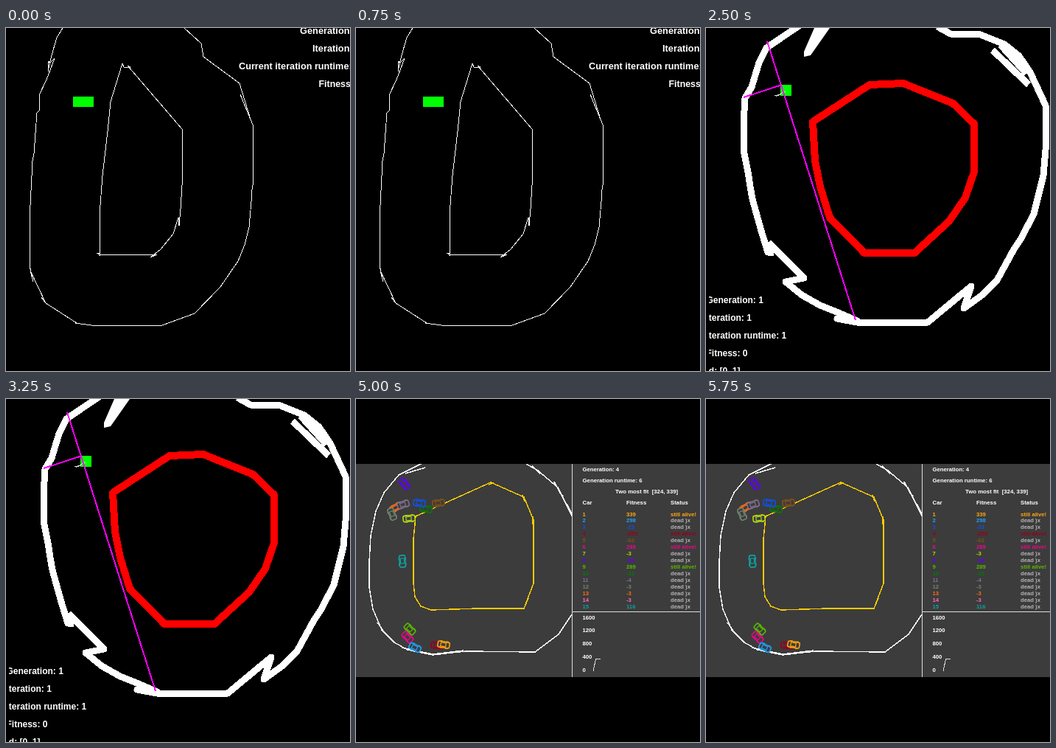
An HTML page that plays this animation: 467x465 px, repeating every 6.25 s.

```html
<!DOCTYPE html>
<html lang="en">
<head>
<meta charset="utf-8">
<title>Evolving cars</title>
<style>
html, body { margin: 0; width: 100%; height: 100%; overflow: hidden; background: #000; }
svg { display: block; width: 100%; height: 100%; }
text { font-family: "Liberation Sans", Arial, sans-serif; font-weight: bold; white-space: pre; }
</style>
</head>
<body>
<svg id="stage" viewBox="0 0 467 465">
  <defs>
    <clipPath id="belowTop"><rect y="4" width="467" height="461"/></clipPath>
    <clipPath id="rightOfEdge"><rect x="4" width="463" height="465"/></clipPath>
    <clipPath id="simTrack"><rect y="87" width="292" height="292"/></clipPath>
    <clipPath id="carTrack"><rect y="88" width="293" height="289"/></clipPath>
  </defs>
</svg>
<script>
const SCENE_MS = 1250;
const stage = document.getElementById("stage");

function add(parent, tag, attrs, content) {
  const el = document.createElementNS("http://www.w3.org/2000/svg", tag);
  for (const key in attrs) el.setAttribute(key, attrs[key]);
  if (content !== undefined) el.textContent = content;
  parent.appendChild(el);
  return el;
}

const line = (parent, d, stroke, width) => add(parent, "path", {
  d, stroke, fill: "none", "stroke-width": width, "stroke-linejoin": "round",
  "shape-rendering": "crispEdges"
});
const box = (parent, x, y, width, height, fill) =>
  add(parent, "rect", { x, y, width, height, fill });
const label = (parent, x, y, str, size, fill = "#fff") =>
  add(parent, "text", { x, y, fill, "font-size": size }, str);
const clipped = (parent, id) => add(parent, "g", { "clip-path": `url(#${id})` });

function outlineTrack(g) {
  line(g, `M77 0L69 13 64 30 60 45 57 59V45L60 47 66 41 55 70 45 91V112L42 115 38 170 36 180
    34 220 32 260V322L37 344 33 329 54 373 48 365 54 373 96 400H94L116 403H212L256 387 291 351
    315 316 324 294 330 270 333 235V225L335 213V131L318 90 332 124 317 75 268 39 265 21 242 0`, "#fff", 1);
  line(g, `M158 48L142 100 138 140 131 200 128 240 127 309V306L123 305 127 307H205L196 311 210 300
    227 279 234 257 235 268 237 245 239 213V137L165 51 169 53H160L158 48`, "#fff", 1);
  box(g, 91, 93, 28, 14, "#0f0");
  label(g, 399, 8, "Generation:", 12.8);
  label(g, 416, 32, "Iteration:", 12.8);
  label(g, 316, 56, "Current iteration runtime:", 12.7);
  label(g, 424.5, 80, "Fitness:", 12.4);
}

function thickTrack(g) {
  line(g, `M43 105V98L103 43M75 52L110 39H165L185 33 205 31 225 24 240 20 275 14H290L310 23 352 64
    M315 49L350 65 362 85 372 120 377 155V210L372 255 367 280 340 332 318 347 300 351 268 366V376
    L250 388 235 391 183 415 112 411 105 404 55 378 35 347 22 315V260L27 200 33 160 43 98`, "#fff", 10);
  line(g, `M132 134L160 133 200 125 235 122 252 115 283 152V220L280 250 275 262 230 290 180 318
    147 321 125 313 115 300 116 275 119 235 122 190 127 155Z`, "red", 10);
  box(g, 97, 125, 15, 15, "#0f0");
  line(g, "M91 91L98 97 104 106 109 118 108 125M101 124L105 130 104 134M103 121L109 127", "#ddd", 1);
  const t = clipped(g, "belowTop");
  label(t, 396, 8, "Generation:1", 12.7);
  label(t, 406, 32, "Iteration:13", 12.5);
  label(t, 311, 56, "Current iteration runtime:4", 12.6);
  label(t, 343, 80, "Fitness:30.65764014123", 12.1);
  label(t, 451, 103, "Id:0", 12.5);
}

function sensorTrack(g) {
  line(g, `M128 -4L110 8 82 27 72 47 62 80 53 95 51 130V165L57 195 60 215 63 232 75 275 84 304H92
    M85 291L133 339 108 344 130 362 155 376 180 386 205 397 178 394 205 399H301L360 350 350 380
    375 362 395 342 418 300 428 285 445 252 458 200 461 165V105L440 60 425 38 405 22 370 8H332L314 -2
    M389 30L438 77M400 23L435 62`, "#fff", 9);
  add(g, "path", { d: "M147 0H168L142 37 133 39V32Z", fill: "#fff" });
  line(g, `M145 127L222 77 268 75 285 82 335 102 364 130V195L352 230 330 262 283 305H215L168 257
    155 215 148 180Z`, "red", 10);
  box(g, 101, 77, 15, 15, "#0f0");
  line(g, "M93 91L98 92 104 87 108 86M95 93L99 90", "#ddd", 1);
  line(g, "M83 18L203 396M51 94L103 77", "#f0f", 2);
  const t = clipped(g, "rightOfEdge");
  ["Generation: 1", "Iteration: 1", "Iteration runtime: 1", "Fitness: 0", "Id: [0, 1]"]
    .forEach((str, i) => label(t, 0.5, 372.5 + 24 * i, str, 12));
}

function table(g, columns, headY, firstY, step, heads, rows) {
  heads.forEach((head, i) => label(g, columns[i], headY, head, 7.8));
  rows.forEach((row, r) => row.cells.forEach((cell, i) =>
    label(g, columns[i], firstY + step * r, cell, 7.7, row.fills[i])));
}

function populationTable(g) {
  line(g, "M0 86.5H467M293 86V379", "#ccc", 1);
  const t = clipped(g, "simTrack");
  line(t, `M127 87L112 91 92 93 80 97 63 98 28 133 22 165 19 210V240L25 278 38 300 55 314 85 323 123 324
    157 295M123 324L135 315H152L185 311 200 307 236 300 268 277 276 240 277 165 258 118 232 92 213 84`, "#fff", 7);
  line(t, `M82 155L98 150 115 149 135 143 163 131 190 134 218 168V244L190 252 100 265 85 257 77 238
    V215L79 195Z`, "red", 6.5);
  [[51, 127, "#484080"], [54, 133, "red"], [45, 136, "#8edcd8"], [44, 143, "#58e078"], [45, 142, "#a0dcd8"],
   [49, 143, "red"], [53, 138, "red"], [51, 158, "#2c5c3c"], [65, 149, "#60a890"], [56, 153, "#e8ecf8"],
   [68, 159, "red"], [77, 143, "red"], [25, 232, "#e0a838"], [32, 250, "#f0e040"]]
    .forEach(([x, y, fill]) => box(t, x, y, 9, 9, fill));

  label(g, 307.5, 99, "Generation: 4", 7.7);
  label(g, 307.5, 114, "Generation runtime: 5", 7.8);
  const fills = ("#dca028 #6aa0c8 #78a8d8 #2c5c3c #58e078 red #d0e838 red red red " +
    "#f09030 red #b0e0e0 #484080 #f0e030 #48b060 red #708080 #c8d0e8 #fff").split(" ");
  const fitness = { 1: "154.7", 2: "30.51", 4: "30.51", 6: "30.08", 9: "30.25", 10: "30.11", 15: "187.88" };
  const runtime = { 6: "3.45", 9: "3.2", 10: "0.51" };
  table(g, [307.5, 366.5, 425.5], 143, 158.5, 8.84, ["Iteration", "Fitness", "Runtime"],
    fills.map((fill, i) => ({
      cells: [i + 1, fitness[i + 1] || "0.0", runtime[i + 1] || "5.31"],
      fills: [fill, fill, fill]
    })));
}

function car(parent, x, y, angle, stroke) {
  const g = add(parent, "g", {
    transform: `translate(${x} ${y}) rotate(${angle})`, stroke, fill: "#3c3c3c", "stroke-width": 1.6
  });
  add(g, "rect", { x: -8, y: -4, width: 16, height: 8, rx: 2 });
  add(g, "rect", { x: -4, y: -2.5, width: 7, height: 5, "stroke-width": 1.2 });
  add(g, "path", { d: "M-5 -4.5H-2M3 -4.5H6M-5 4.5H-2M3 4.5H6" });
}

function carTable(g) {
  box(g, 0, 88, 467, 289, "#3c3c3c");
  const t = clipped(g, "carTrack");
  line(t, `M94 93L67 101M90 87L58 103 38 127 27 152 20 185 18 220V255L23 285 35 313 52 330 70 340 104 347
    130 344 150 342 243 343 275 319 293 292M29 303L39 317M62 337L104 346 146 341M231 88L247 97 274 120
    284 140 294 160M239 91L250 101M269 112L277 127 281 132M286 142L293 156`, "#fff", 1.5);
  line(t, `M81 159L183 113 228 133 241 164V250L228 284 165 284 102 286 88 281 80 268 78 250V190Z
    M180 116L187 114M226 130L229 139M240 159V170M234 270L228 284`, "#fc0", 1.5);

  const fills = ("#ffa510 #20a0f8 #1050e8 #980020 #805018 #e80888 #b0d818 #6000f8 #58b800 #087808 " +
    "#807090 #708470 #ff6a10 #ff68c0 #10a0a0").split(" ");
  [[112, 141, -8, 5], [95, 149, 8, 10], [86, 141, 6, 3], [54, 147, -30, 13], [64, 143, -18, 11],
   [49, 156, 68, 12], [72, 162, -6, 7], [66, 115, 52, 8], [63, 220, 86, 15], [73, 312, 45, 9],
   [70, 323, 45, 6], [80, 337, 25, 2], [110, 334, 6, 4], [119, 333, 10, 1]]
    .forEach(([x, y, angle, id]) => car(t, x, y, angle, fills[id - 1]));

  line(g, "M293 88V377M293 288.5H467", "#ddd", 1);
  label(g, 307.5, 98, "Generation: 4", 7.7);
  label(g, 307.5, 113, "Generation runtime: 6", 7.8);
  label(g, 352, 128, "Two most fit  [324, 339]", 7.8);
  const fitness = [339, 298, -23, -253, -62, 289, -3, -18, 289, -31, -4, -3, -3, -3, 116];
  const alive = [1, 4, 6, 9];
  table(g, [307.5, 367, 427], 143, 158.5, 8.93, ["Car", "Fitness", "Status"],
    fills.map((fill, i) => {
      const lives = alive.includes(i + 1);
      return {
        cells: [i + 1, fitness[i], lives ? "still alive!" : "dead )x"],
        fills: [fill, fill, lives ? fill : "#b4b4b4"]
      };
    }));
  [1600, 1200, 800, 400, 0].forEach((n, i) => label(g, 307.5, 298.5 + 17.9 * i, n, 7.7));
  line(g, "M322 369L325.5 352.5H332", "#ddd", 1);
}

const scenes = [outlineTrack, thickTrack, sensorTrack, populationTable, carTable].map(draw => {
  const g = add(stage, "g", {});
  draw(g);
  return g;
});

function render(ms) {
  const current = Math.floor(ms / SCENE_MS) % scenes.length;
  scenes.forEach((g, i) => g.setAttribute("display", i === current ? "inline" : "none"));
}

const start = performance.now();
function tick() {
  render(performance.now() - start);
  requestAnimationFrame(tick);
}
tick();
</script>
</body>
</html>
```
